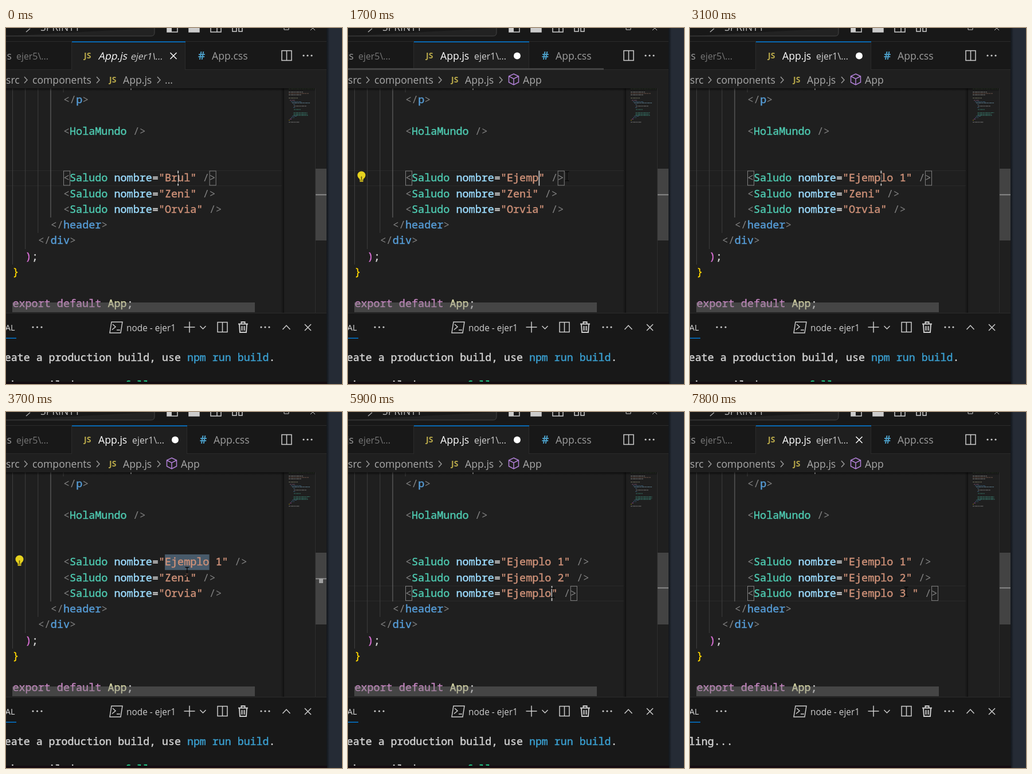
Recreate the animation shown at these times as an HTML page. Size 586 by 620 pixels, loop 8000 ms.

```html
<!DOCTYPE html>
<html lang="es">
<head>
<meta charset="utf-8">
<title>Editor</title>
<style>
html, body { margin: 0; width: 100%; height: 100%; overflow: hidden; background: #1f1f1f; }
svg { display: block; width: 586px; height: 620px; }
text { white-space: pre; }
.code { font: 18.45px "Noto Sans Mono", "DejaVu Sans Mono", monospace; stroke-width: .45; }
.shell { font-size: 18.3px; }
.ui { font: 17.6px "Open Sans", "Noto Sans", sans-serif; }
.small { font-size: 15.4px; }
.note { font-size: 15.9px; }
.slant { transform-box: fill-box; transform-origin: 0 75%; transform: skewX(-12deg); }
.icon { fill: none; stroke: #ccc; stroke-width: 1.5; }
</style>
</head>
<body>
<svg id="stage" viewBox="0 0 586 620">
  <defs>
    <linearGradient id="edge"><stop offset="0" stop-color="#12161b"/><stop offset=".2" stop-color="#252b35"/></linearGradient>
    <linearGradient id="shade" x2="0" y2="1"><stop offset="0" stop-opacity=".55"/><stop offset="1" stop-opacity="0"/></linearGradient>
    <linearGradient id="side"><stop offset="0" stop-opacity="0"/><stop offset="1" stop-opacity=".45"/></linearGradient>
    <clipPath id="body"><rect y="105" width="559" height="391"/></clipPath>
    <clipPath id="shell"><rect y="545" width="559" height="73"/></clipPath>
  </defs>
  <g id="back"></g>
  <g id="live"></g>
  <g id="front"></g>
</svg>
<script>
const LOOP = 8000, CHAR = 11.07, LEFT = 100, ROW = 27.2;
const C = {
  dim: '#808080', type: '#4ec9b0', attr: '#9cdcfe', plain: '#d4d4d4', string: '#ce9178',
  tag: '#569cd6', key: '#c586c0', call: '#dcdcaa', gold: '#ffd700', pink: '#da70d6'
};
const $ = id => document.getElementById(id);
const esc = s => s.replace(/&/g, '&amp;').replace(/</g, '&lt;');
const rect = (x, y, w, h, fill, more = '') =>
  `<rect x="${x}" y="${y}" width="${w}" height="${h}" fill="${fill}" ${more}/>`;
const path = (d, more = 'class="icon"') => `<path d="${d}" ${more}/>`;
const ui = (x, y, s, fill = '#ccc', cls = '', more = '') =>
  `<text class="ui ${cls}" x="${x}" y="${y}" fill="${fill}" ${more}>${esc(s)}</text>`;
const mono = (cls, x, y, parts) => `<text class="code ${cls}" x="${x}" y="${y}">` + parts.map(([s, color]) =>
  `<tspan fill="${color}" stroke="${color === C.dim ? 'none' : color}">${esc(s)}</tspan>`).join('') + '</text>';
const code = (x, y, ...parts) => mono('', x, y, parts);
const shell = (x, y, ...parts) => mono('shell', x, y, parts);
const baseline = row => 131 + 27.27 * row;
const col = n => LEFT + n * CHAR;
const dots = (x, y, gap = 7) =>
  [0, 1, 2].map(i => `<circle cx="${x + i * gap}" cy="${y}" r="1.6" fill="#ccc"/>`).join('');
const cross = (x, y, r, color = '#ccc') =>
  path(`M${x - r} ${y - r}l${2 * r} ${2 * r}m0 ${-2 * r}l${-2 * r} ${2 * r}`, `class="icon" style="stroke:${color}"`);
const split = (x, y) => path(`M${x} ${y}h17v17h-17zm8.5 0v17`);
const chevron = x => path(`M${x} 85l5 5.5l-5 5.5`, 'class="icon" style="stroke:#999"');
const js = (x, y) => ui(x, y, 'JS', '#b9a94a', '', 'style="font-size:14px;font-weight:700"');

function titleBar() {
  return rect(0, 0, 560, 23, '#181818') +
    path('M0 14H253Q259 14 259 8V0', 'fill="#222" stroke="#444"') +
    ui(60, 5, 'SPRINT1', '#bbb') + path('M35 7l7-6', 'class="icon" style="stroke:#aaa"') +
    path('M281-10h18v17h-18zM319-10h18v17h-18zM357-10h18v17h-18zm11 0v17M395-2h7v8h-7zm11 0h6v8h-6z') +
    rect(281, -2, 8, 9, '#ccc') + rect(319, 0, 18, 7, '#ccc') +
    path('M485-6h8v9h-8zM531-4l8 8m-8 0l8-8', 'class="icon" style="stroke-width:1"') +
    rect(0, 23, 560, 1, '#2b2b2b');
}

function breadcrumbs() {
  return rect(0, 74, 560, 31, '#1f1f1f') +
    ui(0, 97, 'src', '#a9a9a9') + chevron(32) + ui(46, 97, 'components', '#a9a9a9') + chevron(158) +
    js(180, 95) + ui(204, 97, 'App.js', '#a9a9a9') + chevron(264);
}

function staticCode() {
  const guide = (n, end, color = '#404040') => rect(col(n) - .4, 105, 1, end - 105, color);
  const brackets = (n, row, open, name, close, color) =>
    code(col(n), baseline(row), [open, C.dim], [name, color], [close, C.dim]);
  return '<g clip-path="url(#body)">' +
    guide(-8, 412) + guide(-6, 385) + guide(-4, 357) + guide(-2, 330, '#707070') + guide(0, 112) +
    rect(217, 105, 2, 3, '#999') +
    brackets(0, 0, '</', 'p', '>', C.tag) +
    brackets(0, 2, '<', 'HolaMundo', ' />', C.type) +
    brackets(-2, 8, '</', 'header', '>', C.tag) +
    brackets(-4, 9, '</', 'div', '>', C.tag) +
    code(col(-6), baseline(10), [')', C.pink], [';', C.plain]) +
    code(col(-8), baseline(11), ['}', C.gold]) +
    code(col(-8), baseline(13), ['export default ', C.key], ['App', C.call], [';', C.plain]) + '</g>';
}

function panel() {
  return rect(0, 496, 560, 124, '#181818') + rect(0, 496, 560, 1, '#2b2b2b') +
    ui(15.5, 527, 'TERMINAL', '#ddd', '', 'text-anchor="end" style="font-size:14.5px"') +
    rect(0, 539.5, 18, 1.5, '#0078d4') + dots(47, 521, 7.5) +
    path('M184 512h19l-3 19h-19zM186 516l5 4.5l-6 5M193 526h6') +
    ui(210, 528, 'node - ejer1', '#ccc', 'small') +
    path('M320 511.500v19M310.500 521h19') + path('M338.500 519l5 5l5-5') + split(369, 512.500) +
    path('M405 515.500h17M410.500 515v-3h6v3M407 516l1 14h11l1-14M411.500 519v8M415.500 519v8',
      'class="icon" style="stroke-width:2"') +
    dots(445, 521) + path('M482.500 525l6.500-7l6.500 7') + cross(526.5, 521.5, 5.5);
}

$('back').innerHTML = rect(0, 0, 586, 620, '#1f1f1f') + titleBar() + breadcrumbs();
$('front').innerHTML =
  rect(0, 105, 540, 5, 'url(#shade)') + rect(479, 105, 6, 391, 'url(#side)') +
  rect(11, 478, 423, 17, '#797979', 'opacity=".42"') +
  rect(539, 105, 1, 391, '#2d2d2d') +
  rect(559, 0, 27, 620, 'url(#edge)') + rect(0, 616, 560, 4, '#140c11');

// Each step: time, then what changes. `at` is [row, column]; `sel` is [from, to].
const START = {
  names: ['Brul', 'Zeni', 'Orvia'], at: [0, 18], sel: null, symbol: false, bulb: -1,
  preview: true, dirty: false, tabScroll: false, compiling: false, marked: false, since: 0
};
const steps = [];
const step = (t, change) => steps.push([t, change]);
const names = START.names.slice();
const put = (t, row, name, more) => {
  names[row] = name;
  step(t, { names: names.slice(), at: [row, 16 + name.length], sel: null, marked: false, ...more });
};
const pick = (t, row) => {
  const end = 16 + names[row].split(' ')[0].length;
  step(t, { at: [row, end], sel: [16, end], marked: false, bulb: -1 });
};

pick(300, 0);
step(400, { symbol: true });
step(650, { marked: true, bulb: 0 });
put(1100, 0, 'E', { dirty: true, preview: false, tabScroll: true });
[[1230, 2], [1350, 3], [1470, 4], [1600, 5], [1800, 6], [1930, 7], [2080, 8], [2300, 9]]
  .forEach(([t, n]) => put(t, 0, 'Ejemplo 1'.slice(0, n)));
step(2350, { tabScroll: false });
step(2800, { bulb: -1 });
step(3000, { at: [0, 21] });
pick(3200, 0);
step(3500, { marked: true, bulb: 0 });
pick(3900, 1);
put(4200, 1, 'Ejemplo');
pick(4500, 2);
step(4750, { marked: true, bulb: 2 });
put(4900, 2, 'Ejemplo');
step(5100, { at: [1, 23], bulb: -1 });
put(5350, 1, 'Ejemplo ');
put(5500, 1, 'Ejemplo 2');
step(5800, { at: [2, 23] });
put(6300, 2, 'Ejemplo ');
put(6550, 2, 'Ejemplo 3');
put(7000, 2, 'Ejemplo 3 ');
step(7500, { dirty: false });
step(7600, { compiling: true });

const mouseStops = [
  [0, 299, 262], [550, 299, 262], [850, 382, 258], [2500, 382, 258], [2900, 333, 262],
  [3500, 333, 262], [3850, 305, 289], [4150, 305, 289], [4400, 312, 314], [4500, 325, 310],
  [4600, 345, 300], [5050, 357, 289], [5500, 357, 289], [5800, 357, 315], [7000, 357, 315],
  [7500, 377, 313], [LOOP, 377, 313]
];

function mouse(t) {
  const i = Math.max(1, mouseStops.findIndex(stop => stop[0] > t));
  const [t0, x0, y0] = mouseStops[i - 1], [t1, x1, y1] = mouseStops[i];
  const u = (t - t0) / (t1 - t0), k = u * u * (3 - 2 * u);
  const x = x0 + (x1 - x0) * k, y = y0 + (y1 - y0) * k;
  return path(`M${x - 3.5} ${y - 8}h2.500l1 1l1-1h2.500M${x} ${y - 7}v14M${x - 3.5} ${y + 8}h2.500l1-1l1 1h2.500`,
    'fill="none" stroke="#080808" stroke-width="1.3"');
}

function stateAt(t) {
  return steps.reduce((s, [when, change]) => when > t ? s :
    { ...s, ...change, since: change.at ? when : s.since }, START);
}

function tabs(s) {
  const shift = s.preview ? 0 : 3, slant = s.preview ? 'slant' : '';
  const end = 313 + shift;
  return rect(0, 24, 560, 49, '#181818') + rect(0, 72, 560, 1, '#2b2b2b') +
    ui(10, 55, 'App.js', '#9d9d9d', '', 'text-anchor="end"') + ui(18, 55, 'ejer5\\...', '#777', 'note') +
    rect(114, 24, end - 114, 50, '#1f1f1f') + rect(114, 24, 1, 49, '#2b2b2b') +
    rect(end - 1, 24, 1, 49, '#2b2b2b') + rect(115, 23.4, end - 115, 1.6, '#0078d4') +
    (s.tabScroll ? rect(0, 70, 446, 3, '#434343') : '') +
    js(136, 53) + ui(161, 55, 'App.js', '#fff', slant) +
    ui(217 + shift, 55, 'ejer1\\...', '#d0d0d0', 'note ' + slant) +
    (s.dirty ? '<circle cx="295" cy="48.500" r="6" fill="#fff"/>' : cross(292 + shift, 48.5, 5.5, '#fff')) +
    ui(335 + shift, 55, '#', '#4b9cc4', '', 'style="font-size:19px;font-weight:700"') +
    ui(359 + shift, 55, 'App.css', '#9d9d9d') + split(481, 39.5) + dots(519, 48);
}

function symbol(s) {
  return s.symbol
    ? path('M289 80l8.500 4v10.500l-8.500 4.500l-8.500-4.500V84zM280.500 84l8.500 4.500l8.500-4.500M289 88.500v10.500',
        'fill="none" stroke="#b180d7" stroke-width="1.500"') + ui(305, 97, 'App', '#a9a9a9')
    : ui(277, 97, '...', '#a9a9a9');
}

function editor(s, t) {
  const [row, at] = s.at, top = 248 + row * ROW;
  let out = '';
  if (s.sel) {
    out += rect(col(s.sel[0]), top, (s.sel[1] - s.sel[0]) * CHAR, ROW, s.marked ? '#485a6a' : '#264f78');
  } else {
    const box = n => rect(col(n) + .5, top + 1, CHAR, 25, 'none', 'stroke="#808080"');
    out += rect(0, top, 481, 1, '#2b2b2b') + rect(0, top + ROW - 1, 481, 1, '#2b2b2b') +
      box(0) + box(19 + s.names[row].length);
  }
  out += staticCode();
  s.names.forEach((name, i) => {
    out += code(LEFT, baseline(5 + i), ['<', C.dim], ['Saludo', C.type], [' nombre', C.attr],
      ['=', C.plain], [`"${name}"`, C.string], [' />', C.dim]);
  });
  if ((t - s.since) % 1000 < 500) out += rect(col(at), top + .5, 1.8, ROW - 1, '#c4c4c4');
  if (s.bulb >= 0) {
    const y = 256.5 + s.bulb * ROW;
    out += `<circle cx="23.500" cy="${y}" r="7" fill="#e6d21e"/>` + rect(20, y + 4, 7, 4, '#e6d21e') +
      rect(20.5, y + 8.5, 6, 3, '#b8a61c') + rect(22.7, y + 2, 1.6, 5, '#5c5210');
  }
  return out;
}

function minimap(s) {
  const bar = (y, x, w, color) => path(`M${x} ${y}h${w}`,
    `stroke="${color}" stroke-width="1.2" stroke-dasharray="3 .8 5 .6" opacity=".45"`);
  const rows = [
    [106, 493, 45, '#6a9955'], [111.5, 493, 25, C.plain], [114, 493, 35, C.string], [116.5, 493, 22, C.plain],
    [122, 493, 16, C.call], [126, 495, 9, C.key], [128.5, 497, 18, C.tag], [130.5, 499, 31, C.attr],
    [133, 501, 4, C.tag], [136, 502, 22, C.plain], [138.5, 501, 4, C.tag], [142, 502, 12, C.type],
    [153.5, 499, 8, C.tag], [156, 497, 6, C.tag], [158.5, 495, 3, C.pink], [160.5, 493, 2, C.gold],
    [164, 493, 19, C.plain]
  ];
  s.names.forEach((name, i) => rows.push([147.5 + i * 2.3, 501.5, 20 + name.length, C.type]));
  const y = 290 + s.at[0] * 8;
  return rows.map(r => bar(...r)).join('') + rect(539, 245, 20, 125, '#434343') +
    rect(540, y - .5, 19, 1.8, '#909090') +
    (s.sel && s.marked ? rect(546, y, 7, 8, '#a0a0a0') : '');
}

function terminal(s) {
  const x = -57;
  return panel() + '<g clip-path="url(#shell)">' + (s.compiling
    ? shell(x, 580, ['Compiling...', C.plain])
    : shell(x, 580, ['To create a production build, use ', C.plain], ['npm run build', '#3a9fd0'], ['.', C.plain]) +
      shell(x, 628, ['webpack compiled ', C.plain], ['successfully', '#23d18b'])) + '</g>';
}

function render(t) {
  const s = stateAt(t);
  $('live').innerHTML = tabs(s) + symbol(s) + editor(s, t) + minimap(s) + terminal(s) + mouse(t);
}

const began = performance.now();
function frame() {
  render((performance.now() - began) % LOOP);
  requestAnimationFrame(frame);
}
frame();
</script>
</body>
</html>
```
